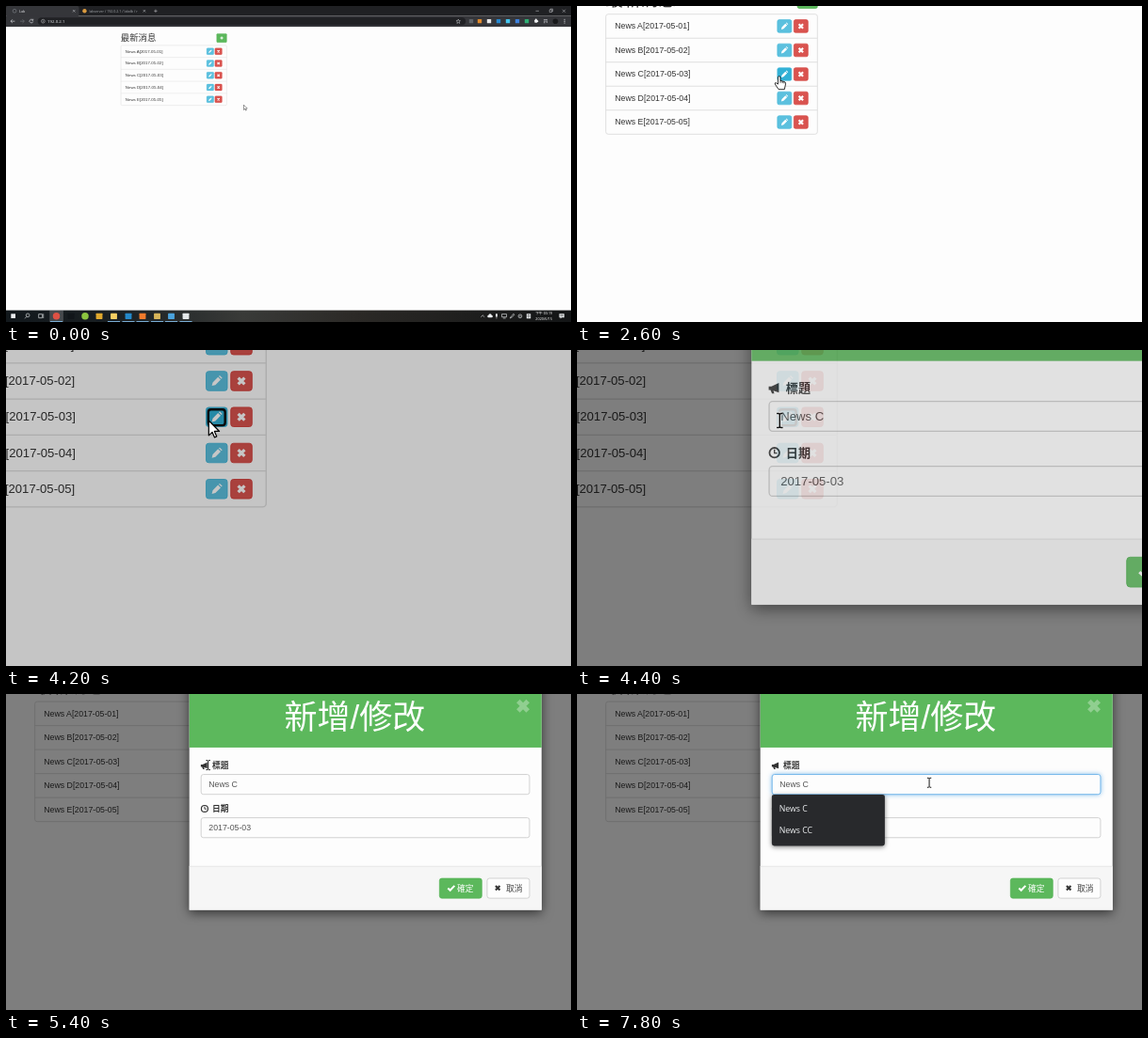
These frames come from a looping animation (600 px wide and 336 px high, 8 s). An HTML page:

```html
<!DOCTYPE html>
<html lang="zh-Hant">
<head>
<meta charset="utf-8">
<title>Lab</title>
<style>
  html, body { margin: 0; width: 100%; height: 100%; overflow: hidden; background: #fdfdfd; }
  svg { display: block; width: 100%; height: 100%; }
  text { font: 14px "Liberation Sans", "Noto Sans CJK TC", "Noto Sans CJK", sans-serif; fill: #333; }
  .ui { font-family: "Open Sans", "Noto Sans CJK TC", "Noto Sans CJK", sans-serif; }
  .light { font-weight: 300; }
  .bold { font-weight: 700; }
</style>
</head>
<body>
<svg id="stage" viewBox="0 0 1920 1080" preserveAspectRatio="none"></svg>
<script>
// The desktop is laid out at 1920 x 1080; a magnifier camera scales it.
const LOOP = 8000;
const rect = (x, y, w, h, fill, more = '') =>
  `<rect x="${x}" y="${y}" width="${w}" height="${h}" fill="${fill}" ${more}/>`;
const circle = (x, y, r, fill, more = '') => `<circle cx="${x}" cy="${y}" r="${r}" fill="${fill}" ${more}/>`;
const text = (x, y, str, style = '', cls = '') => `<text x="${x}" y="${y}" class="${cls}" style="${style}">${str}</text>`;
const line = (d, color, width = 1.5) => `<path d="${d}" fill="none" stroke="${color}" stroke-width="${width}"/>`;
const group = (id, body, more = '') => `<g id="${id}" ${more}>${body}</g>`;

const shapes = {
  pencil: c => `<path fill="${c}" d="M-5.5 5.5L-4.5 1.5 1.5-4.5 4.5-1.5-1.5 4.5ZM2.4-5.4l1-.9 2.9 2.9-.9 1Z"/>`,
  cross: c => line('M-3.6-3.6L3.6 3.6M3.6-3.6L-3.6 3.6', c, 3.5),
  plus: c => line('M-5 0H5M0-5V5', c, 3.4),
  check: c => line('M-5.6 .4L-1.8 4 5.6-3.8', c, 3.3),
  horn: c => `<path fill="${c}" d="M-6.5-2h3L5-6V5L-3.5 2h-3ZM-4.5 2h3l1.3 4h-2.6Z"/>`,
  clock: c => circle(0, 0, 5.6, 'none', `stroke="${c}" stroke-width="1.9"`) + line('M0-3.6V.4H3', c, 1.5)
};
const icon = (name, x, y, color, scale = 1) =>
  `<g transform="translate(${x} ${y}) scale(${scale})">${shapes[name](color)}</g>`;

function browserBar() {
  const pale = '#dfe1e5';
  const extensions = [
    [494, '#5f6368'], [503, '#e08a2c'], [513, '#e8e8e8'], [523, '#2688cf'],
    [533, '#45c5ee'], [543, '#3d82dc'], [553, '#2fae74']
  ];
  return rect(0, 0, 1920, 34, '#202124') + rect(0, 0, 248, 36, '#35363a', 'rx="6"') +
    rect(0, 34, 1920, 37, '#35363a') + rect(108, 39, 1454, 26, '#202124', 'rx="13"') +
    circle(29, 17, 6, 'none', 'stroke="#9aa0a6" stroke-width="1.5"') +
    text(45, 21, 'Lab', `font-size:12px;fill:${pale}`, 'ui') +
    line('M227 13l8 8m0-8l-8 8', pale) +
    circle(267, 17, 7, '#d99a3f') +
    text(283, 21, 'labserver / 192.0.2.1 / labdb / r', 'font-size:11.5px;fill:#a9adb2', 'ui') +
    line('M466 13l8 8m0-8l-8 8M503 17h11m-5.500-5.500v11', pale) +
    line('M1800 17h11M1847 13h8v8h-8ZM1850 13v-3h8v8h-3M1891 12l10 10m0-10l-10 10', pale) +
    line('M30 52H16m6-6l-6 6 6 6', pale, 2) + line('M48 52H62m-6-6l6 6-6 6', '#75787c', 2) +
    line('M91 48a6 6 0 1 0 1 5M92 44v5h-5', pale, 2) +
    circle(126, 52, 6, 'none', `stroke="${pale}" stroke-width="1.5"`) + line('M126 51v4m0-7v1.500', pale) +
    text(141, 57, '192.0.2.1', 'fill:#e8eaed', 'ui') +
    line('M1537 45l2 5 5 .5-4 3.500 1.500 5.500-4.500-3-4.500 3 1.500-5.500-4-3.500 5-.5Z', pale) +
    extensions.map(([x, c]) => rect(x * 3.2 - 7, 45, 14, 14, c, 'rx="2"')).join('') +
    rect(1796, 47, 10, 10, '#f1f3f4', 'rx="2"') + circle(1806, 52, 3, '#f1f3f4') + circle(1801, 46, 3, '#f1f3f4') +
    line('M1827 47h13m-13 5h8m-8 5h5M1838 50v8', pale, 2) +
    circle(1867, 52, 9, '#17181a') +
    [46, 52, 58].map(y => circle(1898, y, 1.8, pale)).join('');
}

function taskbar() {
  const white = '#eceff1';
  const apps = [
    [53.5, '#dd5144'], [69, '#11161a'], [84, '#8bc53f'], [99, '#e0a92e'], [114.5, '#f6cf62'],
    [130, '#2489ca'], [145, '#f27b2c'], [160.5, '#d8b65a'], [175.5, '#4aa3dd'], [191, '#e4e8ea']
  ];
  const cells = apps.map(([cx, color], i) => {
    const x = cx * 3.2;
    const mark = i === 0 || i === 2
      ? circle(x, 1060, 12, color)
      : rect(x - 11, 1050, 22, 20, color, 'rx="2"');
    const running = i === 0 || i > 3;
    return mark + (running ? rect(x - 21, 1077, 42, 3, '#7fb6df') : '');
  }).join('');
  return rect(0, 1040, 1920, 40, 'url(#bar)') + rect(148, 1040, 47, 40, '#fff', 'opacity=".2"') +
    rect(17, 1052, 15, 15, white) +
    circle(74, 1057, 6, 'none', `stroke="${white}" stroke-width="2"`) + line('M70 1062l-6 6', white, 2) +
    line('M111 1053h12v13h-12ZM127 1052v15', white, 2) + cells +
    line('M1614 1063l6-6 6 6', white, 2) +
    rect(1636, 1057, 18, 8, white, 'rx="4"') + circle(1645, 1057, 5, white) +
    rect(1664, 1051, 6, 12, white, 'rx="3"') + line('M1667 1063v6', white) +
    line('M1685 1053h16v10h-16Zm4 14h9', white, 2) + line('M1713 1067l4-7 8-8 3 3-8 8Z', white, 2) +
    circle(1747, 1060, 6, 'none', `stroke="${white}" stroke-width="2"`) + circle(1747, 1060, 2, white) +
    rect(1769, 1052, 14, 16, white) + line('M1773 1056h6v7h-6Z', '#222') +
    text(1828, 1055, '下午 03:19', 'font-size:12px;fill:#fff;text-anchor:middle', 'ui') +
    text(1828, 1074, '2020/6/15', 'font-size:12px;fill:#fff;text-anchor:middle', 'ui') +
    `<path fill="${white}" d="M1880 1052h17v13h-9l-4 4v-4h-4Z"/>` + line('M1883 1056h11m-11 4h11', '#222');
}

function newsList() {
  const rows = [...'ABCDE'].map((letter, i) => {
    const y = 134 + i * 41;
    const id = letter === 'C' ? 'id="edit"' : '';
    return (i ? line(`M390 ${y}.5H750`, '#ddd') : '') +
      text(406, y + 25.5, `News ${letter}[2017-05-0${i + 1}]`) +
      rect(682, y + 10, 24, 22, '#5bc0de', `rx="3" stroke="#46b8da" ${id}`) +
      icon('pencil', 694, y + 21, '#fff') +
      rect(710, y + 10, 24, 22, '#d9534f', 'rx="3" stroke="#d43f3a"') +
      icon('cross', 722, y + 21, '#fff');
  }).join('');
  return text(390, 120, '最新消息', 'font-size:30px', 'light') +
    rect(716, 94.5, 34, 30, '#5cb85c', 'rx="3" stroke="#4cae4c"') + icon('plus', 733, 109.5, '#fff') +
    rect(390.5, 134.5, 359.5, 205, 'none', 'rx="4" stroke="#ddd" stroke-width="1.5"') + rows +
    rect(684.5, 228.5, 19, 18, 'none', 'id="ring" rx="3" stroke="#0b0b0b" stroke-width="2.6"');
}

function dialog() {
  const field = (y, value, id) =>
    rect(673, y, 558, 34, '#fdfdfd', `id="${id}" rx="4" stroke="#ccc" stroke-width="1.4"`) +
    text(686, y + 22, value, 'fill:#555');
  return rect(653, 60, 598.5, 430.5, '#fdfdfd', 'style="filter:drop-shadow(0 5px 9px rgba(0,0,0,.6))"') +
    rect(653, 60, 598.5, 153, '#5cb85c') +
    text(934, 181, '新增/修改', 'font-size:56px;fill:#fff;text-anchor:middle', 'light') +
    icon('cross', 1220, 142, 'rgba(255,255,255,.32)', 2.3) +
    icon('horn', 679, 244, '#333') + text(692, 249, '標題', '', 'bold') + field(259, 'News C', 'title') +
    icon('clock', 679, 317.5, '#333') + text(692, 323, '日期', '', 'bold') + field(333, '2017-05-03', 'date') +
    rect(653, 416, 598.5, 74.5, '#f6f6f6') + line('M653 416H1251.5', '#e5e5e5') +
    rect(1078, 436.5, 72, 34, '#5cb85c', 'rx="4" stroke="#4cae4c"') +
    icon('check', 1098, 453, '#fff') + text(1108, 459, '確定', 'fill:#fff') +
    rect(1159, 436.5, 72, 34, '#fdfdfd', 'rx="4" stroke="#ccc" stroke-width="1.4"') +
    icon('cross', 1177, 453, '#333') + text(1191, 459, '取消', 'fill:#444', 'light') +
    group('menu',
      rect(672.5, 293.5, 192, 87.5, '#28292c', 'rx="4" style="filter:drop-shadow(0 2px 4px rgba(0,0,0,.5))"') +
      text(685, 323, 'News C', 'fill:#eceef0', 'ui') + text(685, 359, 'News CC', 'fill:#eceef0', 'ui'));
}

const outlined = d => `<path d="${d}" fill="#fff" stroke="#000" stroke-width="1.3" stroke-linejoin="round"/>`;
const beam = 'M-3.500-8H-1L0-7 1-8H3.500M0-7V7M-3.500 8H-1L0 7 1 8H3.500';
const pointers = {
  arrow: outlined('M0 0V17L4 13.300 6.600 19.200 9 18.200 6.500 12.300H12Z'),
  hand: outlined('M-2 1.500a2 2 0 0 1 4 0V7l7 2q2.500 .8 2 3.500L9 22H-1L-7 13q-.8-2.800 1.800-2.200L-2 13Z') +
    line('M2 7v4M5.500 8v3.500M8.500 9v3', '#000', 1.1),
  beam: line(beam, 'rgba(255,255,255,.7)', 3.6) + line(beam, '#111', 1.6)
};

const stage = document.getElementById('stage');
stage.innerHTML = `<defs><linearGradient id="bar">
    <stop offset="0" stop-color="#12181c"/><stop offset=".2" stop-color="#1a2023"/>
    <stop offset=".42" stop-color="#393a38"/><stop offset=".62" stop-color="#2b2926"/>
    <stop offset="1" stop-color="#131516"/></linearGradient></defs>` +
  group('desktop',
    rect(0, 0, 1920, 1080, '#fdfdfd') + newsList() +
    rect(0, 71, 1920, 969, '#000', 'id="shade"') + group('dialog', dialog()) +
    browserBar() + taskbar() +
    group('cursor', Object.entries(pointers).map(([name, body]) => group(name, body)).join('')));

const part = {};
stage.querySelectorAll('[id]').forEach(node => part[node.id] = node);
const show = (name, on) => part[name].setAttribute('visibility', on ? 'visible' : 'hidden');

const progress = (t, from, to) => Math.min(1, Math.max(0, (t - from) / (to - from)));
const smooth = p => p * p * (3 - 2 * p);
const easeOut = p => 1 - (1 - p) ** 2;

function draw(t) {
  const zoom = 1 + smooth(progress(t, 1700, 2100)) + smooth(progress(t, 2850, 3250)) -
    smooth(progress(t, 4900, 5250));
  const focusY = 241 + 2 * progress(t, 4900, 5250);
  part.desktop.setAttribute('transform',
    `translate(${-683 * (zoom - 1)} ${-focusY * (zoom - 1)}) scale(${zoom})`);

  const approach = smooth(progress(t, 200, 1100));
  const toField = smooth(progress(t, 6200, 7000));
  const x = 808 - 123 * approach + 255 * toField;
  const y = 338 - 97 * approach + 2 * progress(t, 4900, 5250) + 30 * toField;
  part.cursor.setAttribute('transform', `translate(${x} ${y})`);

  const overEdit = x < 706 && y < 248 && t < 4134;
  const betweenTexts = x > 722 && y < 259;
  const pointer = overEdit ? 'hand' : t < 4350 || betweenTexts ? 'arrow' : 'beam';
  Object.keys(pointers).forEach(name => show(name, name === pointer));
  part.edit.setAttribute('fill', overEdit || t > 4000 ? '#31b0d5' : '#5bc0de');
  show('ring', t >= 4100);

  part.shade.setAttribute('opacity', 0.5 * progress(t, 4134, 4284));
  part.dialog.setAttribute('opacity', progress(t, 4284, 4434));
  part.dialog.setAttribute('transform', `translate(0 ${-107 * (1 - easeOut(progress(t, 4284, 4584)))})`);

  const focused = t >= 7000;
  part.title.setAttribute('stroke', focused ? '#66afe9' : '#ccc');
  part.title.style.filter = focused ? 'drop-shadow(0 0 4px rgba(102,175,233,.8))' : 'none';
  show('menu', t >= 7400);
}

function tick() {
  draw(performance.now() % LOOP);
  requestAnimationFrame(tick);
}
tick();
</script>
</body>
</html>
```
